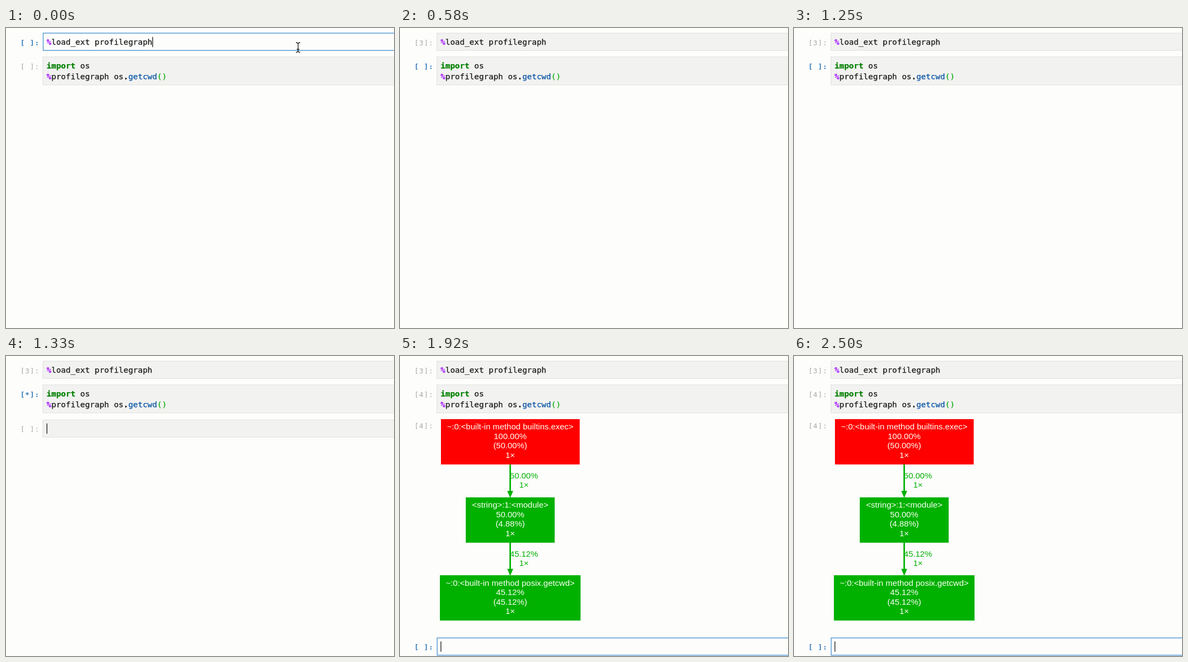
Animation, 720 px wide and 556 px high, one loop 5080 ms. Source, as an HTML page with a canvas:

```html
<!DOCTYPE html>
<html lang="en">
<head>
<meta charset="utf-8">
<title>Notebook profile graph</title>
<style>
html, body { margin: 0; width: 100%; height: 100%; overflow: hidden; background: #fdfdfc; }
canvas { display: block; }
</style>
</head>
<body>
<canvas id="stage" width="720" height="556"></canvas>
<script>
const ctx = document.getElementById('stage').getContext('2d');
const LOOP = 5080;
const MONO = '"DejaVu Sans Mono", monospace';
const SANS = '"Liberation Sans", Arial, sans-serif';
const PITCH = 8.92;
const PAGE = '#fdfdfc', CELL = '#f2f2f0', INK = '#1a1a1a', BLUE = '#2f78b8', DIM = '#a9a9a2';
const GREEN = '#00b100', RED = '#ff0000', CREAM = '#fffff8';

// Moments of the hard changes, in ms
const FIRST_RUN = 580, SECOND_RUN = 1330, RESULT = 1420;
const CARET_OFF = 2000, CARET_ON = 2500;

function rect(x, y, w, h, color) {
  ctx.fillStyle = color;
  ctx.fillRect(x, y, w, h);
}

function cell(y, h, focused) {
  rect(68, y, 660, h, focused ? PAGE : CELL);
  ctx.lineWidth = focused ? 1.4 : 1;
  ctx.strokeStyle = focused ? '#4c94cf' : '#e0e0e0';
  ctx.strokeRect(focused ? 69 : 68.5, y + 0.5, 660, h - 1);
}

function prompt(mark, y, active) {
  ctx.font = (active ? 'bold ' : '') + '13px ' + MONO;
  ctx.fillStyle = active ? BLUE : DIM;
  ctx.textAlign = 'center';
  [...`[${mark}]:`].forEach((c, i) => ctx.fillText(c, 30.6 + i * PITCH, y));
}

// Each part is [text, color, bold]; a hairline stroke thickens the glyphs
function code(y, ...parts) {
  let x = 75.3;
  ctx.textAlign = 'left';
  ctx.lineWidth = 0.25;
  for (const [text, color = INK, bold] of parts) {
    ctx.font = (bold ? 'bold ' : '') + '14.82px ' + MONO;
    ctx.fillStyle = ctx.strokeStyle = color;
    ctx.fillText(text, x, y);
    ctx.strokeText(text, x, y);
    x += text.length * PITCH;
  }
}

function caret(x, y) {
  rect(x, y, 1.3, 19, '#111');
}

function mouseBeam(x, y) {
  ctx.strokeStyle = '#222';
  ctx.lineWidth = 1.4;
  ctx.beginPath();
  for (const s of [-1, 1]) {
    ctx.moveTo(x - 4, y + s * 9);
    ctx.quadraticCurveTo(x, y + s * 9, x, y + s * 6);
    ctx.quadraticCurveTo(x, y + s * 9, x + 4, y + s * 9);
  }
  ctx.moveTo(x, y - 7);
  ctx.lineTo(x, y + 7);
  ctx.moveTo(x - 2.5, y + 3.5);
  ctx.lineTo(x + 2.5, y + 3.5);
  ctx.stroke();
}

function lines(list, x, y, color) {
  ctx.font = '15.45px ' + SANS;
  ctx.textAlign = 'center';
  ctx.fillStyle = color;
  list.forEach((s, i) => ctx.fillText(s, x, y + i * 17.45));
}

function node(x, y, w, color, list) {
  rect(x, y, w, 84, color);
  lines(list, 204.5, y + 19.3, CREAM);
}

function edge(y, share) {
  const x = 204.5;
  rect(x - 1.4, y, 2.8, 50, GREEN);
  ctx.beginPath();
  ctx.moveTo(x - 5.5, y + 49);
  ctx.lineTo(x + 5.5, y + 49);
  ctx.lineTo(x, y + 62);
  ctx.fill();
  lines([share, '1×'], 230, y + 26, GREEN);
}

function graph() {
  edge(201, '50.00%');
  edge(345.5, '45.12%');
  node(76, 117, 257.5, RED,
    ['~:0:<built-in method builtins.exec>', '100.00%', '(50.00%)', '1×']);
  node(122, 262, 165, GREEN,
    ['<string>:1:<module>', '50.00%', '(4.88%)', '1×']);
  node(74, 406.3, 261, GREEN,
    ['~:0:<built-in method posix.getcwd>', '45.12%', '(45.12%)', '1×']);
}

function draw(t) {
  const fresh = t < FIRST_RUN;
  const running = t >= SECOND_RUN && t < RESULT;
  const done = t >= RESULT;
  const percent = ['%', '#a61fff', true];

  rect(0, 0, 720, 556, PAGE);

  cell(9, 33, fresh);
  prompt(fresh ? ' ' : '3', 31.5, fresh);
  code(31, percent, ['load_ext profilegraph']);

  cell(53, 53, false);
  prompt(done ? '4' : running ? '*' : ' ', 75.8, !fresh && !done);
  code(75, ['import', '#008000', true], [' os']);
  code(94.6, percent, ['profilegraph os'], ['.', INK, true],
    ['getcwd', '#0a55a5'], ['()', '#12ad12']);

  if (fresh) {
    caret(271.5, 16.5);
    mouseBeam(542, 36);
  }
  if (running) {
    cell(118, 33, false);
    prompt(' ', 140, false);
    caret(75.3, 125);
  }
  if (done) {
    prompt('4', 134, false);
    graph();
    cell(522, 33, true);
    prompt(' ', 544, true);
    if (t < CARET_OFF || t >= CARET_ON) caret(75.3, 529);
  }
}

const start = performance.now();
function tick() {
  draw((performance.now() - start) % LOOP);
  requestAnimationFrame(tick);
}
tick();
</script>
</body>
</html>
```
